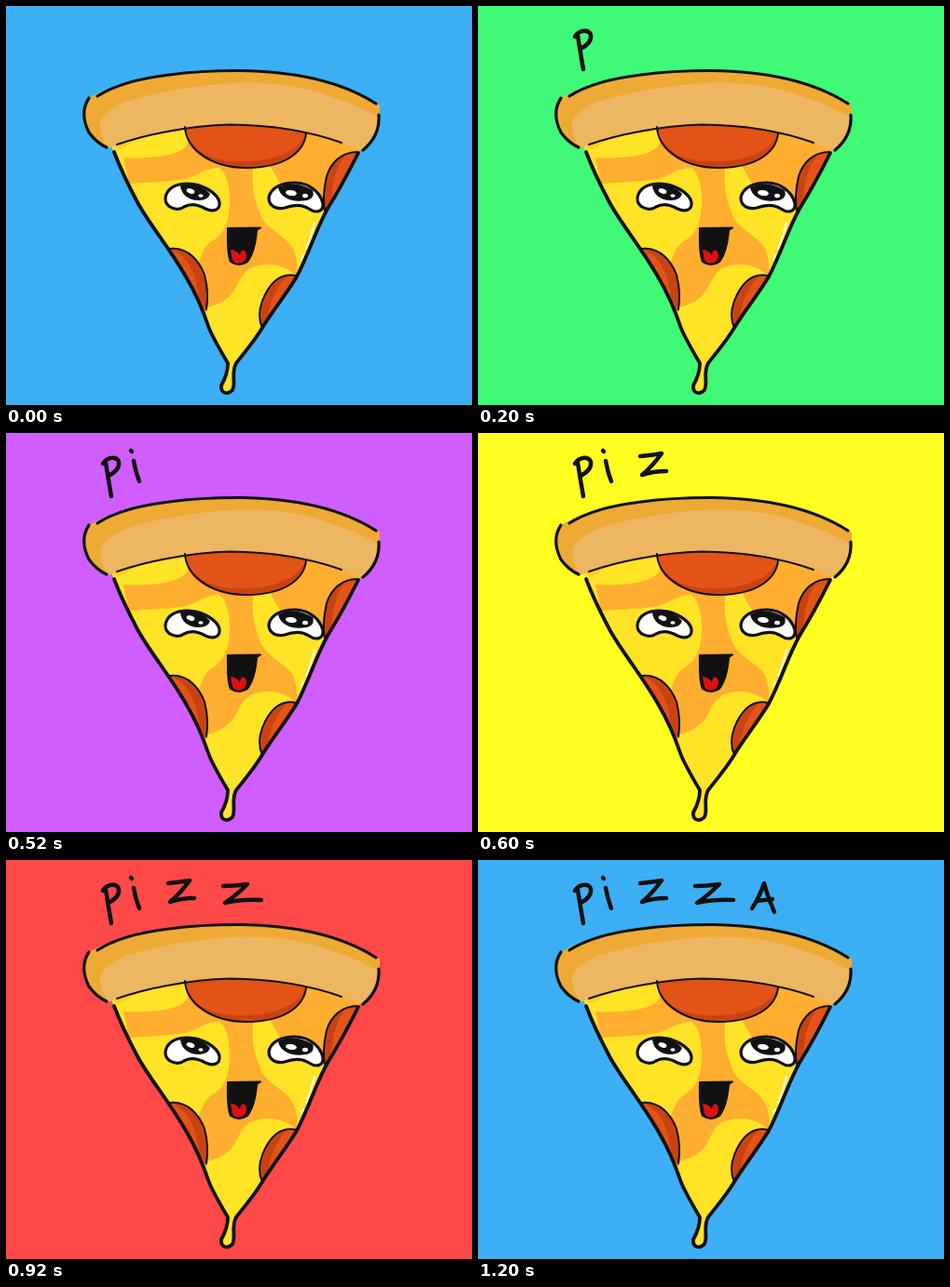
Recreate the animation shown at these times as an HTML page. Size 500 by 429 pixels, loop 1.4 s.

```html
<!DOCTYPE html>
<html lang="en">
<head>
<meta charset="utf-8">
<title>Pizza</title>
<style>
  html, body { margin: 0; width: 100%; height: 100%; overflow: hidden; }
  svg { display: block; width: 100%; height: 100%; }
  .ink { fill: none; stroke: #111; stroke-width: 3.2; stroke-linecap: round; stroke-linejoin: round; }
  .edge { stroke-width: 3.8; }
  .thin { stroke-width: 2; }
  .letter { stroke-width: 4.5; }
</style>
</head>
<body>
<svg viewBox="0 0 500 429" role="img" aria-label="Pizza">
  <defs>
    <clipPath id="slice">
      <path id="cheese" d="M112 148L130 125L365 125L380 154C369 177 355 202 345 218C333 239 326 264 312 291C300 311 285 329 275 346C266 361 257 371 247 384C242 393 246 403 244 411C242 418 231 418 231 409C236 402 238 394 238 384C228 367 220 353 217 344C210 323 203 308 193 291C174 258 154 235 141 211C130 190 121 170 112 148Z"/>
    </clipPath>
    <clipPath id="crustShape">
      <path id="crust" d="M91 98C116 84 150 77 175 74C200 70 225 69 250 69C278 69 306 72 330 77C358 83 382 95 401 107C402 128 395 146 384 156C340 138 295 128 240 127C195 128 150 138 109 153C95 144 84 128 84 115Q85 106 91 98Z"/>
    </clipPath>
    <clipPath id="mouthShape">
      <path id="mouth" d="M238 239L273 238.500L269 241C268 254 266 266 259 275Q250 281 241 275C237 267 238 252 238 239Z"/>
    </clipPath>
  </defs>

  <rect id="back" width="500" height="429"/>

  <use href="#cheese" fill="#ffe326"/>
  <g clip-path="url(#slice)">
    <g fill="#ffae30">
      <path d="M126 163C150 164 180 163 192 152Q200 144 192 128L265 128L265 175C263 195 267 209 272 222C277 240 301 247 308 261Q314 276 312 291C300 278 282 275 264 281C250 288 251 300 240 312Q229 322 211 325L205 280C211 266 212 258 222 252C239 243 242 218 239 196Q237 180 229 174C211 174 203 186 185 187C165 190 150 189 132 191Z"/>
      <path d="M282 170L320 130L385 150L345 219L333 200L296 194Z"/>
    </g>
    <path d="M115 150L196 130Q192 136 170 137Q142 141 121 155Z" fill="#ffd01e"/>
    <g fill="#e35217">
      <path d="M192 128C193 151 217 174 258 174C299 174 320 157 322 137L300 120Z"/>
      <path d="M381 157C360 155 349 168 344 183Q339 206 342 221L390 180Z"/>
      <path d="M173 261C196 258 208 276 213 289Q218 309 215 329L180 290Z"/>
      <path d="M314 290C292 286 281 302 275 317Q269 333 275 348L300 330Z"/>
    </g>
    <g fill="#c94312">
      <path d="M194 142C209 166 238 168 263 167C294 165 315 153 322 137C318 161 298 174 258 174C222 174 199 159 194 142Z"/>
      <path d="M367 158Q351 171 349 211L342 221Q339 206 344 183Q350 164 367 158Z"/>
      <path d="M178 262C193 267 204 287 207 312L215 329Q218 309 213 289C208 276 195 258 178 262Z"/>
      <path d="M303 289Q282 310 281 340L275 348Q269 333 275 317Q282 294 303 289Z"/>
    </g>
  </g>

  <use href="#crust" fill="#edb660"/>
  <path clip-path="url(#crustShape)" fill="#efaa35" d="M80 160V60H410L402 121C387 112 370 104 350 98C317 84 270 80 230 84C190 87 151 95 126 104Q108 112 101 124Q100 139 110 154Z"/>

  <g class="ink">
    <path d="M98 97C118 84 150 77 175 74C200 70.500 225 69.500 250 69.500C278 70 306 72.500 330 78C356 84 380 94 397 105"/>
    <path d="M89 99C81 111 83 124 89 136Q97 147 108 152"/>
    <path d="M400 117C401 133 394 146 383 155"/>
    <path class="thin" d="M119 149C150 138 195 129 240 127.500C285 128 327 135 360 147"/>
    <path class="edge" d="M116 157C122 173 131 192 141 211C154 235 174 258 193 291C203 308 210 323 217 344C220 353 228 367 238 384C238 394 235 401 231 408C230 417 238 418 243 413C247 405 241 394 247 384C257 371 266 361 275 346C285 329 300 311 312 291C326 264 333 239 345 218C355 202 367 180 378 158"/>
    <g class="thin">
      <path d="M192 130C193 151 217 174 258 174C299 174 320 157 322 137"/>
      <path d="M377 157C360 157 349 168 344 183Q339 206 342 220"/>
      <path d="M175 261C196 258 208 276 213 289Q218 309 215 326"/>
      <path d="M311 290C292 286 281 302 275 317Q269 333 275 346"/>
    </g>
  </g>

  <path fill="none" stroke="#fff8d0" stroke-linecap="round" stroke-width="2.200" d="M331 233Q328 247 322 261M319 268L317 272"/>

  <g class="ink">
    <path fill="#fff" d="M171 207C172 196 182 191 195 191C210 191 227 201 229 211C230 221 221 221 214 218C205 213 198 212 191 216C184 221 171 217 171 207Z"/>
    <path fill="#fff" d="M282 206C284 195 296 190 310 190C325 190 337 200 340 212C341 222 332 223 325 218C316 212 307 214 299 217C291 219 282 216 282 206Z"/>
  </g>
  <g fill="#111">
    <path d="M187 193Q206 188 219 202Q217 209 207 209C196 209 188 203 187 193Z"/>
    <path d="M292 195Q309 186 329 198Q332 207 322 209C307 212 294 206 292 195Z"/>
  </g>
  <g fill="#fff">
    <ellipse cx="198" cy="199" rx="4.500" ry="2.600" transform="rotate(18 198 199)"/>
    <ellipse cx="209" cy="204" rx="2.600" ry="1.700"/>
    <ellipse cx="306" cy="201" rx="6" ry="3" transform="rotate(8 306 201)"/>
    <ellipse cx="321" cy="204" rx="3" ry="2.200"/>
  </g>

  <use href="#mouth" fill="#111"/>
  <path clip-path="url(#mouthShape)" fill="#e01010" d="M241 262Q247 262 251 268Q252 261 256 263Q260 267 256 274Q248 280 243 273Z"/>
  <use href="#mouth" class="ink thin"/>

  <g id="word" class="ink letter">
    <path d="M107 32Q110 51 113 68M104 33C109 25 119 25 121 31C122 38 116 43 110 46"/>
    <path d="M137 30Q139 42 143 52M134 19L135 20"/>
    <path d="M174 25Q186 24 197 22Q187 36 176 45Q188 41 202 41"/>
    <path d="M233 28Q246 28 259 26Q247 38 235 46Q253 42 274 43"/>
    <path d="M294 52Q302 40 307 25Q311 41 318 56M299 44L316 42"/>
  </g>
</svg>
<script>
  const STEP = 200;
  const colors = ["#3daff5", "#40f977", "#d05eff", "#ffff22", "#ff4848", "#ffb400", "#3daff5"];
  const back = document.getElementById("back");
  const letters = [...document.getElementById("word").children];

  function draw(time) {
    const beat = Math.floor(time / STEP) % colors.length;
    back.setAttribute("fill", colors[beat]);
    letters.forEach((letter, i) => {
      letter.setAttribute("visibility", i < beat ? "visible" : "hidden");
    });
  }

  const start = performance.now();
  function tick() {
    draw(performance.now() - start);
    requestAnimationFrame(tick);
  }
  tick();
</script>
</body>
</html>
```
